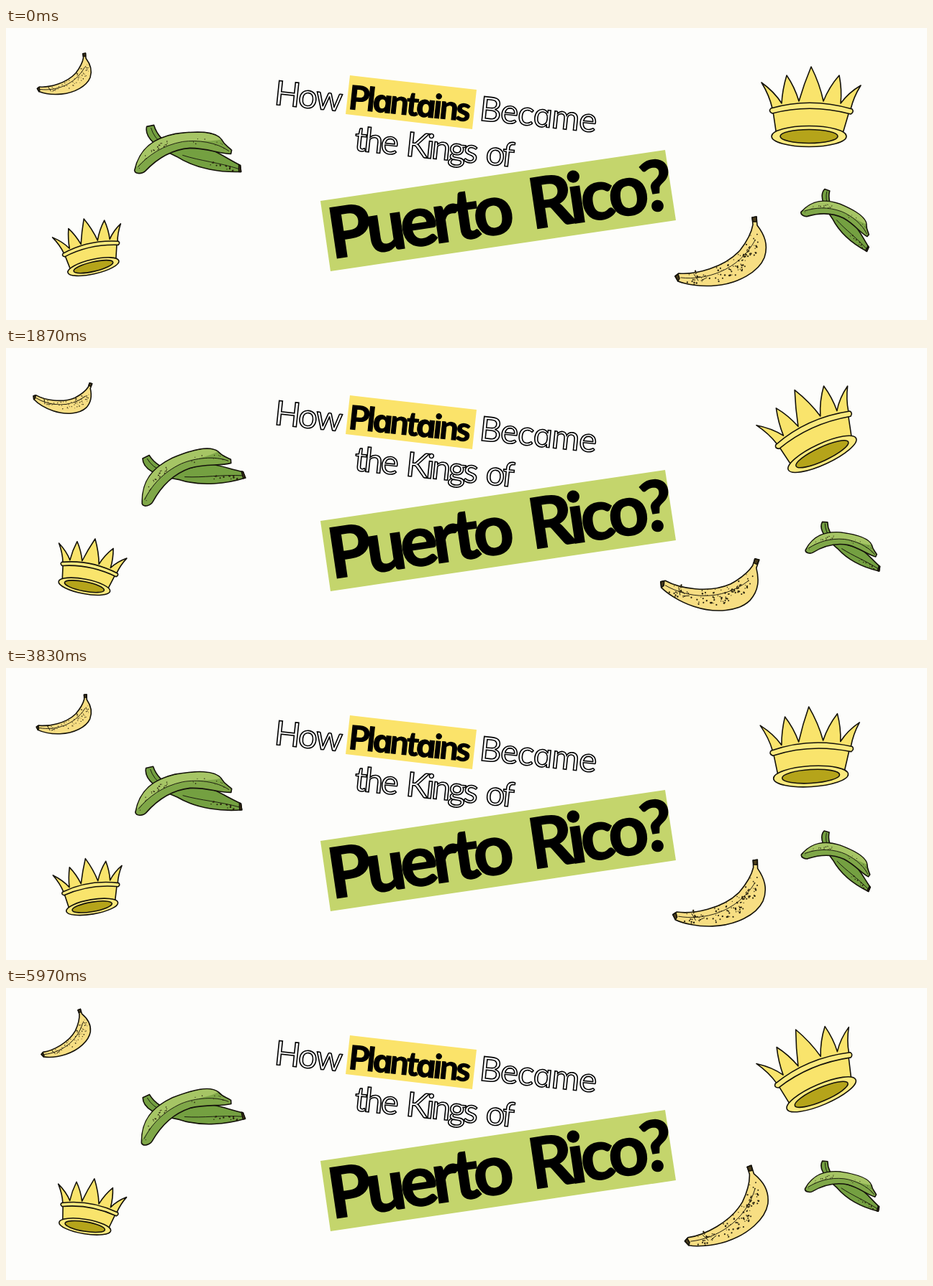
Recreate the animation shown at these times as an HTML page. Size 1280 by 407 pixels, loop 6.01 s.

```html
<!DOCTYPE html>
<html lang="en">
<head>
<meta charset="utf-8">
<title>How Plantains Became the Kings of Puerto Rico?</title>
<style>
  html, body { margin: 0; width: 100%; height: 100%; overflow: hidden; }
  body { background: #fdfdfb; }
  svg { display: block; width: 100%; height: 100%; }
  #art path, #art ellipse {
    stroke: #14120a; stroke-width: 1.6; stroke-linejoin: round; stroke-linecap: round;
    vector-effect: non-scaling-stroke;
  }
  #art .line { fill: none; stroke-width: .9; }
  #art .flat { stroke: none; }
  #art .dark { fill: #4a3d1c; }
  text { font-family: Lato, "Open Sans", sans-serif; }
  .a { font-family: Inter, Lato, sans-serif; font-size: .93em; font-feature-settings: "cv11"; }
  .thin { font-size: 47px; font-weight: 400; fill: #fff; stroke: #000; stroke-width: 1.6; }
  .bold { font-size: 46px; font-weight: 700; letter-spacing: -3px; stroke: #000; stroke-width: 1.2; }
  .big {
    font-size: 97px; font-weight: 700; letter-spacing: -7px; word-spacing: 13px;
    stroke: #000; stroke-width: 2;
  }
</style>
</head>
<body>
<svg viewBox="0 0 1280 407" preserveAspectRatio="none">
  <path fill="#fbe36a" d="M478 66L654 86L648 141L472 120Z"/>
  <path fill="#c4d56c" d="M437 241L916 170L931 268L451 339Z"/>
  <g id="title"></g>
  <g id="art"></g>
</svg>
<script>
const LOOP = 6010;
const TURNS = [0, 2060, 4085, LOOP];   // times at which the swing changes direction

let seed = 7;
const rnd = () => (seed = seed * 16807 % 2147483647) / 2147483647;

const dot = (x, y, r) => `<circle cx="${x.toFixed(1)}" cy="${y.toFixed(1)}" r="${r.toFixed(2)}" fill="#2a2410"/>`;

// Speckles scattered around a quadratic curve through three control points
function speckles(count, [x0, y0], [x1, y1], [x2, y2], spread, size) {
  let out = '';
  for (let i = 0; i < count; i++) {
    const t = rnd(), s = 1 - t;
    out += dot(s * s * x0 + 2 * s * t * x1 + t * t * x2 + (rnd() - .5) * spread,
               s * s * y0 + 2 * s * t * y1 + t * t * y2 + (rnd() - .5) * spread,
               size * (.5 + rnd() * .6));
  }
  return out;
}

const crown = `
  <path fill="#f9e46c" d="M-53 4Q-57 -14 -68 -32Q-50 -19 -40 -3Q-39 -22 -33 -42Q-22 -26 -16 -6
    Q-9 -30 1 -54Q13 -30 18 -6Q26 -26 40 -42Q44 -22 42 -3Q53 -18 70 -28Q60 -12 56 5Z"/>
  <path fill="#f9e46c" d="M-52 8L-47 42H44L54 8Q0 -6 -52 8Z"/>
  <path fill="#fae97e" d="M-55 4Q0 -12 58 5Q61 9 56 12Q0 -3 -53 11Q-59 8 -55 4Z"/>
  <ellipse fill="#fae97e" cx="-2" cy="43" rx="52" ry="14.5"/>
  <ellipse fill="#b5a41a" cx="-2" cy="43" rx="40" ry="9.5"/>`;

const banana = count => `
  <path fill="#f7de83" d="M-33 54C-10 56 30 46 52 22C62 9 68 -2 70 -14L69 -24L75 -25L76 -13
    C86 0 92 14 86 32C78 52 50 68 18 71C-4 73 -24 69 -34 65L-38 58Z"/>
  <path class="line" d="M-30 60C5 64 50 50 73 8M-12 55l6 9M-2 64l8 -4"/>
  <path class="dark" d="M-34 55L-38 58L-34 65L-32 61ZM69 -24L75 -25L75 -18L70 -18Z"/>
  ${speckles(count, [-20, 62], [58, 58], [77, 2], 19, 1.2)}`;

const plantains = `
  <path fill="#74a041" d="M-60 -30L-50 -32C-46 -18 -36 -8 -20 0L20 0C35 2 50 14 70 24L71 33
    C45 34 10 30 -18 12C-45 0 -64 -14 -60 -30Z"/>
  <path class="line" d="M-10 10C15 18 40 20 68 29M-54 -28Q-50 -14 -38 -6"/>
  <path class="dark" d="M68 23L70 24L71 33L68 33Z"/>
  <path fill="#7fa748" d="M-77 31C-70 0 -50 -14 -20 -20C10 -24 35 -24 44 -12C48 -4 52 -3 58 3L57 8
    C40 8 25 0 0 0C-25 2 -45 14 -62 32C-66 36 -76 37 -77 31Z"/>
  <path class="flat" fill="#a6c565" d="M-75 27C-68 0 -50 -13 -20 -19C10 -23 34 -23 43 -12
    C30 -9 10 -11 -10 -9C-38 -4 -58 10 -75 27Z"/>
  <path class="line" d="M-72 26C-58 10 -38 -4 -10 -9C10 -12 38 -8 54 4"/>
  ${speckles(20, [-74, 30], [-60, 5], [-30, -8], 9, 1)}
  ${speckles(12, [30, 22], [40, 27], [62, 30], 6, 1.2)}
  ${speckles(10, [0, -10], [25, -12], [50, -2], 9, .7)}`;

const place = (inner, x, y, scale, angle = 0) =>
  `<g transform="translate(${x} ${y}) rotate(${angle}) scale(${scale})">${inner}</g>`;

// Pivot, swing in degrees, value reached at the end of the loop, drawing
const UP = .95, BACK = -.54;
const parts = [
  [81.5, 63.5, 24.5, BACK, place(banana(60), -15.5, -13.5, .593)],
  [255.6, 167.4, -15, UP, plantains],
  [116, 303, 24, UP, place(crown, 0, 0, .7, -13)],
  [1118, 108, -25, UP, crown],
  [1204, 246, -15, UP, place(plantains, -39.8, 19, .72, 30.3)],
  [968, 288, 23.7, BACK, banana(100)]
];

const art = document.getElementById('art');
art.innerHTML = parts.map(p => `<g>${p[4]}</g>`).join('');

const line = (words, x, y, angle, cls, style = '') =>
  `<text class="${cls}" style="${style}" transform="translate(${x} ${y}) rotate(${angle})">` +
  words.replace(/a/g, '<tspan class="a">a</tspan>') + '</text>';

document.getElementById('title').innerHTML =
  line('How', 372, 106.5, 6, 'thin', 'letter-spacing:-2px') +
  line('Plantains', 475, 112.5, 6, 'bold') +
  line('Became', 657, 128.5, 6, 'thin', 'letter-spacing:-.8px') +
  line('the Kings of', 483, 170.5, 6, 'thin', 'letter-spacing:-3.2px;word-spacing:5px') +
  line('Puerto Rico?', 453, 321.5, -8.4, 'big');

function swing(t, end) {
  const marks = [0, 1.1, 0, end];
  const i = t < TURNS[1] ? 0 : t < TURNS[2] ? 1 : 2;
  return marks[i] + (marks[i + 1] - marks[i]) * (t - TURNS[i]) / (TURNS[i + 1] - TURNS[i]);
}

function draw() {
  const t = performance.now() % LOOP;
  parts.forEach(([x, y, angle, end], i) =>
    art.children[i].setAttribute('transform',
      `translate(${x} ${y}) rotate(${(angle * swing(t, end)).toFixed(3)})`));
  requestAnimationFrame(draw);
}
draw();
</script>
</body>
</html>
```
